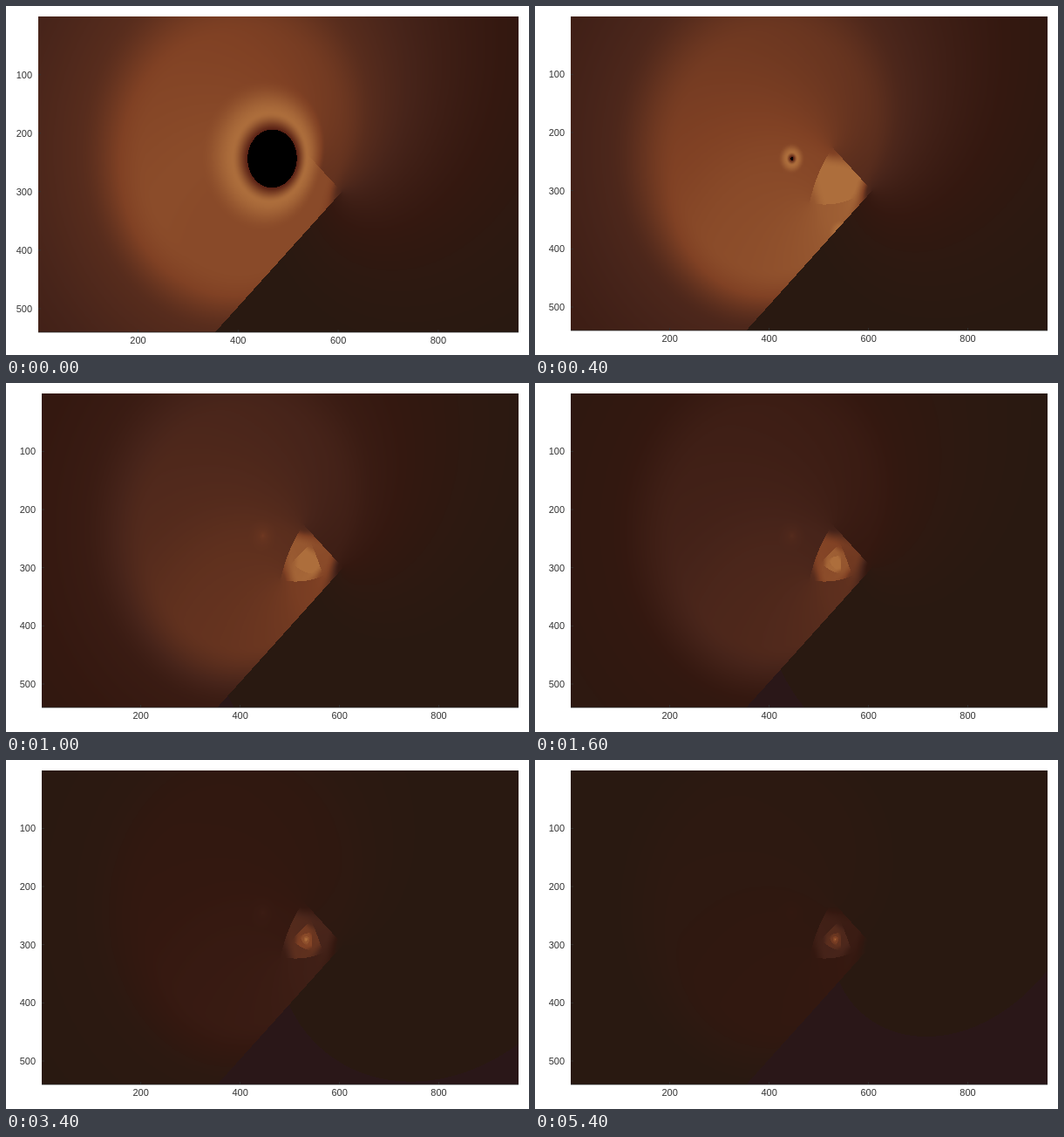
Recreate the animation shown at these times as an HTML page with a canvas. Size 600x400 px, loop 6.2 s.

```html
<!DOCTYPE html>
<html>
<head>
<meta charset="utf-8">
<style>
  html, body { margin: 0; width: 100%; height: 100%; overflow: hidden; background: #fff; }
  canvas { display: block; }
</style>
</head>
<body>
<canvas id="stage" width="600" height="400"></canvas>
<script>
const ctx = document.getElementById('stage').getContext('2d');
const LOOP = 6200, STEP = 200, RAD = Math.PI / 180;
const CUT = 223.5 * RAD, ROOT = 137.2 * RAD, SCALE = 108.8;
const BX = 226 * Math.cos(-136 * RAD), BY = 226 * Math.sin(-136 * RAD);
const GAIN = 0.225, TOP = 0.9;

// Dark holes of the first three steps: centre and radius after one iteration
const HOLES = [[-10, 56, 44], [-7, 69.5, 18], [-4.3, 77.7, 2.5]];

const STOPS = [
  [0, 41, 25, 17], [0.03, 41, 25, 17], [0.1, 52, 24, 16], [0.2, 71, 36, 26],
  [0.45, 128, 65, 36], [TOP, 173, 110, 60]
];
const palette = Array.from({ length: 901 }, (_, i) => {
  const t = i / 1000;
  if (t < 0.0068) return [42, 23, 24];
  let j = 1;
  while (j < STOPS.length - 1 && t > STOPS[j][0]) j++;
  const a = STOPS[j - 1], b = STOPS[j], f = (t - a[0]) / (b[0] - a[0]);
  return [1, 2, 3].map(c => a[c] + (b[c] - a[c]) * f);
});

const smooth = (a, b, x) => {
  const t = Math.min(1, Math.max(0, (x - a) / (b - a)));
  return t * t * (3 - 2 * t);
};

// Iterates z -> B (1 - sqrt(z / root)) and colours by how long z stays near
function shade(x, y, step, gain) {
  const hole = HOLES[step];
  let value = 0, weight = 1, near = 9;
  for (let n = 0; n < step + 2; n++) {
    let angle = Math.atan2(y, x);
    if (angle <= CUT - 2 * Math.PI) angle += 2 * Math.PI;
    const m = Math.sqrt(Math.hypot(x, y) / SCALE), h = (angle - ROOT) / 2;
    const re = 1 - m * Math.cos(h), im = -m * Math.sin(h);
    x = BX * re - BY * im;
    y = BX * im + BY * re;
    if (hole && n <= step) {
      const d = Math.hypot(x - hole[0], y - hole[1]);
      near = Math.min(near, (d - hole[2]) / (hole[2] * 0.4 + 6));
    }
    const dist = Math.hypot(x + 4.3, y - 77.7);
    const stay = 1 - smooth(150, 220, dist);
    const far = 0.42 * Math.exp(-Math.pow(dist / 290, 1.6));
    value += weight * ((1 - stay) * far + stay * GAIN);
    if (n === 0) value += 0.05 * Math.max(0, Math.log(25 / (dist + 1)));
    weight *= stay;
    if (weight < 0.002) break;
  }
  if (near < 0) return [0, 0, 0];
  let t = Math.min(TOP, value * gain);
  t = Math.max(t, TOP - (TOP - t) * smooth(0.8, 2.8, near));
  const rgb = palette[Math.round(t * 1000)];
  if (near >= 1) return rgb;
  const f = smooth(-0.3, 1, near), red = [75, 20, 14];
  return rgb.map((c, i) => red[i] + (c - red[i]) * f);
}

function draw(step) {
  const left = step ? 41 : 37, bottom = step ? 372 : 374, top = 12, right = 588;
  const w = right - left, h = bottom - top, sx = w / 960, sy = h / 540;
  const gain = Math.min(1.2 - 0.1 * Math.min(step, 2), 4 / (step + 2));
  const image = ctx.createImageData(w, h);
  for (let j = 0, p = 0; j < h; j++) {
    for (let i = 0; i < w; i++, p += 4) {
      const rgb = shade((i + 0.5) / sx - 607, 299.3 - (j + 0.5) / sy, step, gain);
      image.data[p] = rgb[0];
      image.data[p + 1] = rgb[1];
      image.data[p + 2] = rgb[2];
      image.data[p + 3] = 255;
    }
  }
  ctx.fillStyle = '#fff';
  ctx.fillRect(0, 0, 600, 400);
  ctx.putImageData(image, left, top);

  ctx.fillStyle = '#333';
  ctx.fillRect(left, bottom - 0.5, w, 0.8);
  ctx.font = '11px "Liberation Sans", Arial, sans-serif';
  ctx.textAlign = 'center';
  for (let v = 200; v < 960; v += 200) {
    const x = left + (v - 0.5) * sx;
    ctx.fillText(v, x, bottom + 13);
    ctx.fillRect(x - 0.4, bottom - 3, 0.8, 3);
  }
  ctx.textAlign = 'right';
  for (let v = 100; v < 540; v += 100) {
    const y = top + (v - 0.5) * sy;
    ctx.fillText(v, left - 7, y + 4);
    ctx.fillRect(left, y - 0.4, 3, 0.8);
  }
}

const start = performance.now();
let shown = -1;
function frame() {
  const time = (performance.now() - start) % LOOP;
  const step = Math.min(27, Math.floor(time / STEP));
  if (step !== shown) draw(shown = step);
  requestAnimationFrame(frame);
}
frame();
</script>
</body>
</html>
```
